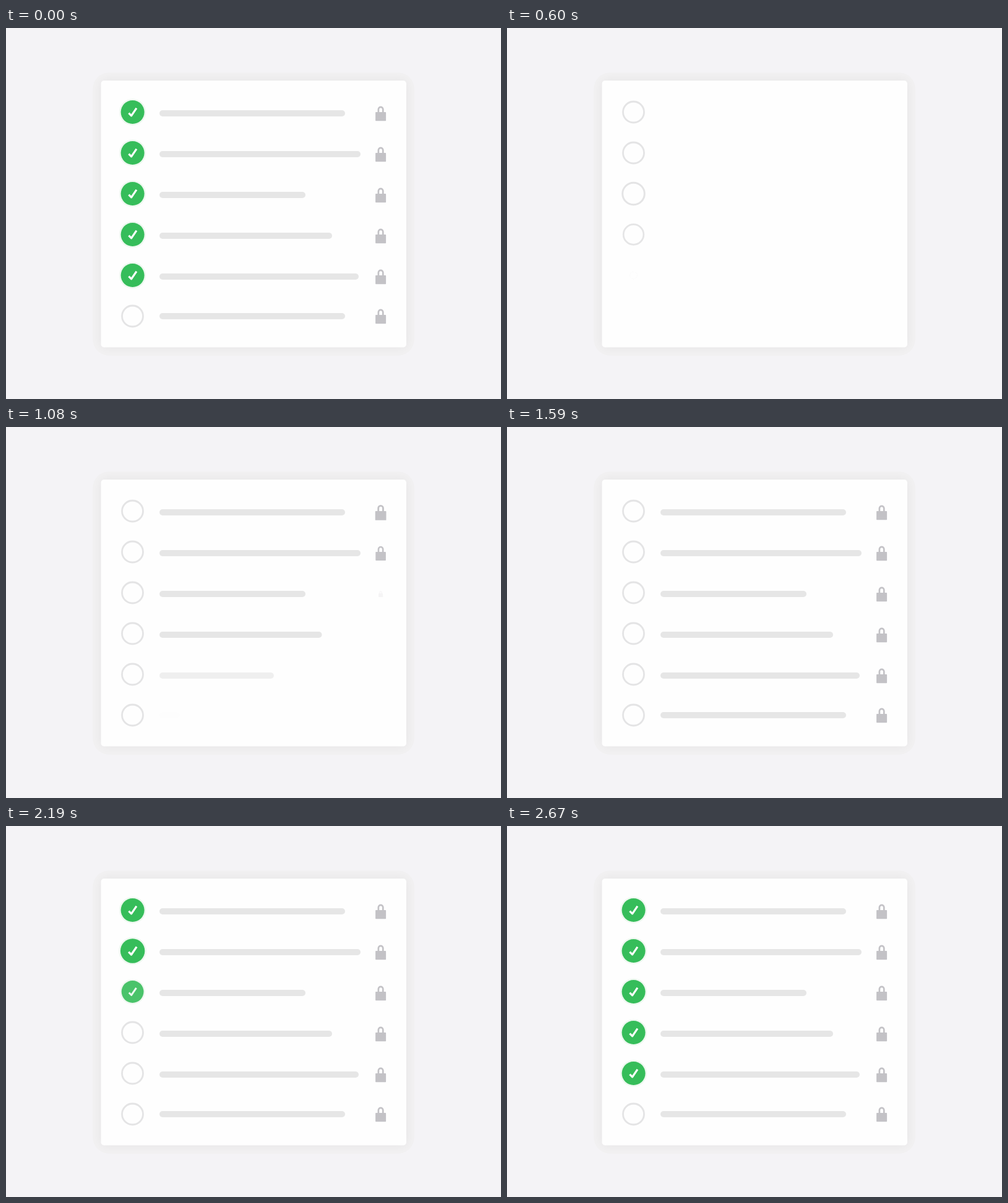
These frames come from a looping animation (800x600 px, 3930 ms). An HTML page with a canvas:

```html
<!DOCTYPE html>
<html lang="en">
<head>
<meta charset="utf-8">
<title>Checklist</title>
<style>
  html, body { margin: 0; width: 100%; height: 100%; overflow: hidden; background: #f4f3f6; }
  canvas { display: block; }
</style>
</head>
<body>
<canvas id="stage" width="800" height="600"></canvas>
<script>
const ctx = document.getElementById('stage').getContext('2d');
const LOOP = 3930, STEP = 30;
const BAR_WIDTHS = [300, 325, 236, 279, 322, 300];
const CHECKED = 5;

// Each group enters row by row: first start, delay per row, length, fade-in (ms)
const RINGS  = { start: 255,  stagger: 80,    length: 260, fade: 120 };
const BARS   = { start: 605,  stagger: 90,    length: 250, fade: 200 };
const LOCKS  = { start: 890,  stagger: 80,    length: 260, fade: 120 };
const CHECKS = { start: 1810, stagger: 126.5, length: 330, fade: 160 };

const clamp = v => Math.max(0, Math.min(1, v));
const smooth = p => p * p * (3 - 2 * p);
const glide = p => (p * (2 - p) + smooth(p)) / 2;
const backOut = p => {
  const s = 1.2, u = p - 1;
  return 1 + (s + 1) * u ** 3 + s * u * u;
};

function box(x, y, w, h, r, color) {
  ctx.fillStyle = color;
  ctx.beginPath();
  ctx.roundRect(x, y, w, h, r);
  ctx.fill();
}

function disc(r, color) {
  ctx.fillStyle = color;
  ctx.beginPath();
  ctx.arc(0, 0, r, 0, Math.PI * 2);
  ctx.fill();
}

function line(width, color) {
  ctx.lineWidth = width;
  ctx.strokeStyle = color;
  ctx.stroke();
}

function drawCard() {
  box(0, 0, 800, 600, 0, '#f4f3f6');
  box(140, 72, 520, 458, 27, '#f2f1f2');
  ctx.save();
  ctx.shadowColor = 'rgba(0,0,0,0.06)';
  ctx.shadowBlur = 18;
  box(153.5, 85, 493.5, 431.5, 5, '#fefefe');
  ctx.restore();
}

function drawRing() {
  ctx.beginPath();
  ctx.arc(0, 0, 17, 0, Math.PI * 2);
  line(2.8, '#e4e4e5');
}

function drawCheck() {
  disc(21.5, '#edf8ef');
  disc(19, '#36bd5a');
  ctx.beginPath();
  ctx.moveTo(-6.2, 1.6);
  ctx.lineTo(-2, 5.8);
  ctx.lineTo(6.3, -6.4);
  ctx.lineJoin = 'round';
  line(3.2, '#fff');
}

function drawLock() {
  box(-8.5, -2, 17, 14.2, 0.8, '#c3c2c6');
  ctx.beginPath();
  ctx.moveTo(-3.7, -1.5);
  ctx.lineTo(-3.7, -6.5);
  ctx.arc(0, -6.5, 3.7, Math.PI, 0);
  ctx.lineTo(3.7, -1.5);
  line(2.7, '#c3c2c6');
}

// Pops a shape in around its own centre
function pop(group, row, t, x, y, draw) {
  const age = t - group.start - row * group.stagger;
  if (age <= 0) return;
  const scale = backOut(clamp(age / group.length));
  ctx.save();
  ctx.globalAlpha = smooth(clamp(age / group.fade));
  ctx.translate(x, y);
  ctx.scale(scale, scale);
  draw();
  ctx.restore();
}

function drawBar(row, t, y) {
  const age = t - BARS.start - row * BARS.stagger;
  if (age <= 0) return;
  const width = BAR_WIDTHS[row] * glide(clamp(age / BARS.length));
  ctx.globalAlpha = smooth(clamp(age / BARS.fade));
  box(248, y - 5, width, 10, 5, '#e6e6e6');
  ctx.globalAlpha = 1;
}

function render(t) {
  drawCard();
  for (let row = 0; row < 6; row++) {
    const y = 136 + row * 66;
    const midY = row < 5 ? y + 2 : y;
    pop(RINGS, row, t, 204.5, y, drawRing);
    drawBar(row, t, midY);
    pop(LOCKS, row, t, 605.6, midY, drawLock);
    if (row < CHECKED) pop(CHECKS, row, t, 204.6, y, drawCheck);
  }
}

function tick() {
  const t = Math.floor((performance.now() % LOOP) / STEP) * STEP;
  render(t < STEP ? LOOP : t); // the full list is held for one step before clearing
  requestAnimationFrame(tick);
}
tick();
</script>
</body>
</html>
```
